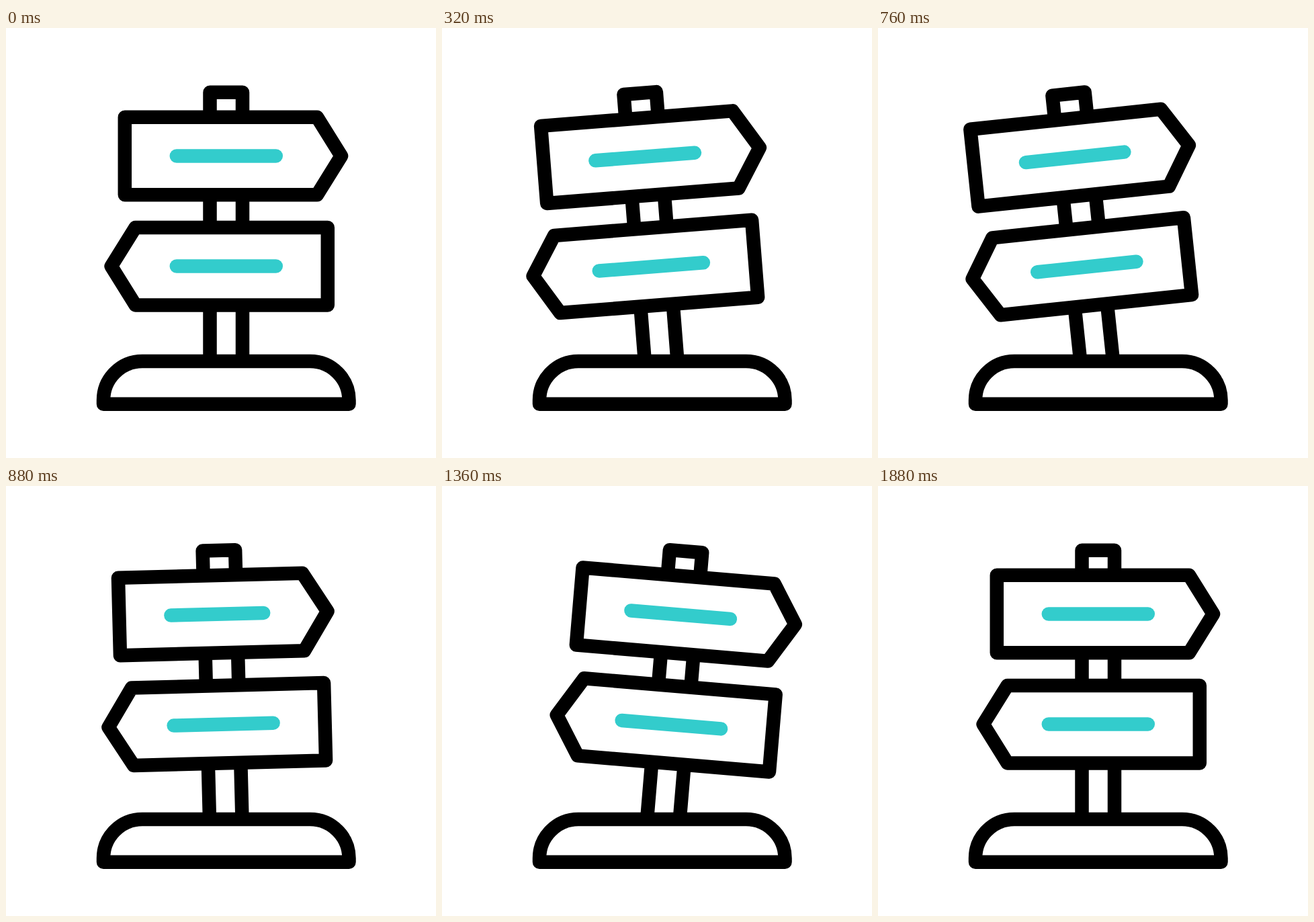
Recreate the animation shown at these times as an HTML page. Size 640 by 640 pixels, loop 2000 ms.

```html
<!DOCTYPE html>
<html lang="en">
<head>
<meta charset="utf-8">
<title>Swaying signpost</title>
<style>
  html, body { margin: 0; width: 100%; height: 100%; overflow: hidden; background: #fff; }
  svg { display: block; width: 100vw; height: 100vh; }
  path { fill: #fff; stroke: #000; stroke-width: 20.5; stroke-linecap: round; stroke-linejoin: round; }
  .bar { stroke: #3cc; }
</style>
</head>
<body>
<svg viewBox="0 0 640 640">
  <g id="post">
    <path d="M303.5 500V95.7H352V500"/>
    <g id="top"><path/><path class="bar"/></g>
    <g id="low" transform="translate(655.6 164.1) scale(-1 1)"><path/><path class="bar"/></g>
  </g>
  <path d="M145 559.7V554A58 58 0 0 1 203 496H452.5A58 58 0 0 1 510.5 554V559.7Z"/>
</svg>
<script>
const LOOP = 2000, STEP = 40;
const LEFT = 9.03, RIGHT = 6.07;

// Smooth rise from 0 to 1 between two times.
function ramp(t, from, to) {
  const u = Math.min(1, Math.max(0, (t - from) / (to - from)));
  return u * u * (3 - 2 * u);
}

const sway = t =>
  -LEFT * ramp(t, 40, 600) + (LEFT + RIGHT) * ramp(t, 600, 1160) - RIGHT * ramp(t, 1160, 1845);

// Shrink by dip, shoot out to peak, then settle.
const stretch = (t, dip, peak) =>
  -dip * ramp(t, 0, 180) + (dip + peak) * ramp(t, 180, 390) - peak * ramp(t, 390, 550);

// Both signs are drawn pointing right; the lower one is mirrored.
function drawSign(id, t, peak) {
  const [board, bar] = document.getElementById(id).children;
  const s = stretch(t, 13, peak);
  board.setAttribute("d", `M176.8 132.8H${463 + s}L${499 + s} 190.5L${463 + s} 248.3H176.8Z`);
  bar.setAttribute("d", `M253.8 190.5H${401.8 + stretch(t, 11, 29)}`);
}

function draw(t) {
  drawSign("low", t - 40, 34);
  drawSign("top", t - 730, 50);
  document.getElementById("post").setAttribute("transform", `rotate(${sway(t)} 327.8 516)`);
}

const start = performance.now();
function tick() {
  const t = (performance.now() - start) % LOOP;
  draw(Math.floor(t / STEP) * STEP);
  requestAnimationFrame(tick);
}
tick();
</script>
</body>
</html>
```
